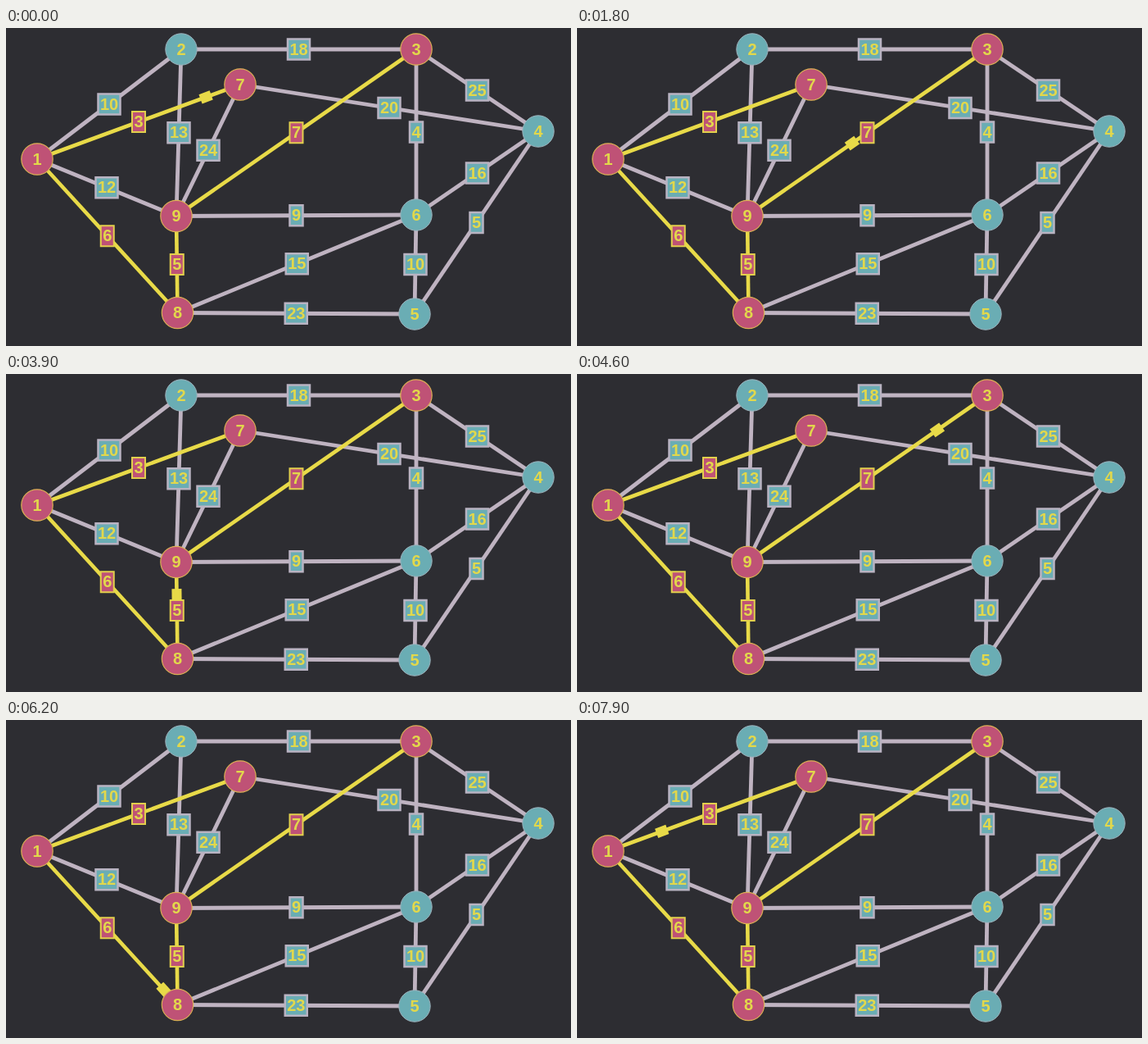
Write an HTML page that moves like this. It is 690 px wide and 388 px high and loops after 8 s.

```html
<!DOCTYPE html>
<html lang="en">
<head>
<meta charset="utf-8">
<title>Weighted graph route</title>
<style>
  html, body { margin: 0; width: 100%; height: 100%; overflow: hidden; background: #2d2d32; }
  svg { display: block; width: 690px; height: 388px; }
  text { font: bold 20px "Liberation Sans", Arial, sans-serif; text-anchor: middle; fill: #e2d84b; }
  line { stroke: #bfb3c1; stroke-width: 4.8; }
  rect { fill: #6aadb4; stroke: #b9b3c2; stroke-width: 2.5; }
  circle { fill: #6aadb4; stroke: #9db2bc; stroke-width: 1; }
  .on line { stroke: #e8da48; stroke-width: 4.6; }
  .on rect, .on circle { fill: #bf5276; stroke: #e2cf4c; }
  .on rect { stroke-width: 2; }
  .on circle { stroke: #dcb054; stroke-width: 1.2; }
  #marker { fill: #e8da48; stroke: none; }
</style>
</head>
<body>
<svg viewBox="0 0 690 388">
  <g id="lines"></g>
  <g id="labels"></g>
  <rect id="marker" x="-7" y="-6" width="14" height="12"/>
  <g id="nodes"></g>
</svg>
<script>
const nodes = {
  1: [38, 160], 2: [214, 26], 3: [501, 26], 4: [650, 126], 5: [499, 349],
  6: [501, 228], 7: [286, 69], 8: [209.5, 347.5], 9: [208, 229.5]
};
// from-to:weight
const edges = `1-2:10 1-9:12 2-3:18 2-9:13 7-9:24 7-4:20 3-4:25 3-6:4 6-4:16
  5-4:5 9-6:9 8-6:15 8-5:23 6-5:10 1-7:3 1-8:6 8-9:5 9-3:7`;
const route = "71893";
const LOOP = 8000, LAP = 2525, LEAD = 97, STEP = 100;
const SPEED = 0.46; // px per ms
const REST = 175;   // stop at node 1; the lap's spare time is spent at node 3

const byId = id => document.getElementById(id);

function add(parent, tag, attrs, text) {
  const el = document.createElementNS("http://www.w3.org/2000/svg", tag);
  for (const key in attrs) el.setAttribute(key, attrs[key]);
  if (text !== undefined) el.textContent = text;
  return parent.appendChild(el);
}

const group = (id, on) => add(byId(id), "g", on ? { class: "on" } : {});
const onRoute = (a, b) => route.includes(a + b) || route.includes(b + a);

for (const edge of edges.split(/\s+/)) {
  const [a, b, weight] = edge.split(/[-:]/);
  const [x1, y1] = nodes[a], [x2, y2] = nodes[b];
  const on = onRoute(a, b);
  add(group("lines", on), "line", { x1, y1, x2, y2 });

  const x = (x1 + x2) / 2, y = (y1 + y2) / 2;
  const w = 5 + 11 * weight.length, h = 25;
  const label = group("labels", on);
  add(label, "rect", { x: x - w / 2, y: y - h / 2, width: w, height: h });
  add(label, "text", { x, y: y + 6.5 }, weight);
}

for (const id in nodes) {
  const [x, y] = nodes[id];
  const node = group("nodes", route.includes(id));
  add(node, "circle", { cx: x, cy: y, r: 19.2 });
  add(node, "text", { x, y: y + 6.5 }, id);
}

const marker = byId("marker");

function place([x1, y1], [x2, y2], k) {
  const angle = Math.atan2(y2 - y1, x2 - x1) * 180 / Math.PI;
  marker.setAttribute("transform",
    `translate(${x1 + (x2 - x1) * k} ${y1 + (y2 - y1) * k}) rotate(${angle})`);
}

function draw(now) {
  const t = Math.floor(now % LOOP / STEP) * STEP;
  let left = (t + LEAD) % LAP;
  for (let i = 0; i < route.length - 1; i++) {
    const from = nodes[route[i]], to = nodes[route[i + 1]];
    const time = Math.hypot(to[0] - from[0], to[1] - from[1]) / SPEED;
    const stay = route[i + 1] === "1" ? REST : 0;
    place(from, to, Math.min(1, left / time));
    left -= time + stay;
    if (left < 0) break;
  }
}

const begin = performance.now();
function frame() {
  draw(performance.now() - begin);
  requestAnimationFrame(frame);
}
frame();
</script>
</body>
</html>
```
